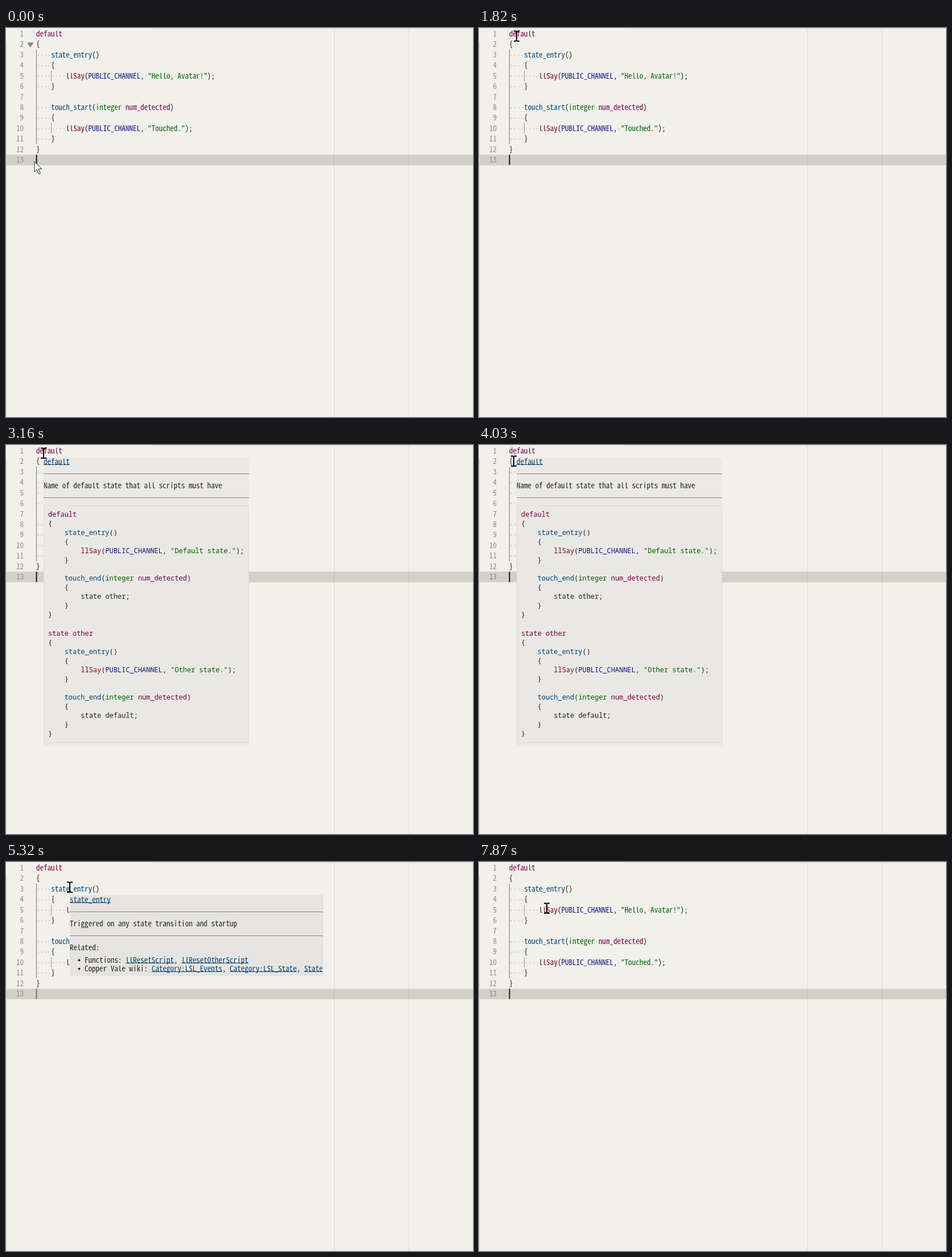
Animation of 820x683 px, one loop 8 s. Source, as an HTML page:

```html
<!DOCTYPE html>
<html lang="en">
<head>
<meta charset="utf-8">
<title>Script editor hover help</title>
<style>
  html, body { margin: 0; width: 100%; height: 100%; overflow: hidden; background: #f1f0eb; }
  svg { display: block; width: 100%; height: 100%; }
  text { white-space: pre; fill: #222; }
  .ui { font-family: "Noto Sans Mono CJK JP", "Noto Sans Mono CJK SC", "Noto Sans Mono", monospace; }
  .code { font-family: "Noto Sans Mono", "DejaVu Sans Mono", monospace; }
  text.keyword { fill: #780042; }
  text.event, text.link { fill: #004475; }
  text.type, text.string { fill: #006000; }
  text.call { fill: #80002c; }
  text.constant { fill: #14147f; }
  text.number { fill: #8d8b85; text-anchor: end; }
</style>
</head>
<body>
<svg id="stage" viewBox="0 0 820 683" xmlns="http://www.w3.org/2000/svg">
  <rect width="820" height="683" fill="#f1f0eb"/>
  <rect x="257" width="563" height="1" fill="#d6d5d0"/>
  <rect width="1" height="24" fill="#fafaf8"/>
  <rect y="24" width="1" height="659" fill="#d8d7d2"/>
  <rect x="1" y="222.5" width="819" height="18.5" fill="#d3d0c8"/>
  <path d="M576.5 1V683M707.5 1V683" stroke="#000" stroke-opacity=".085"/>
  <path d="M53.5 38V204" stroke="#77766f"/>
  <path d="M79.5 75V94M79.5 167V185.500" stroke="#96958f"/>
  <g id="editor"></g>
  <path id="fold" d="M37 25.500H48.500L42.750 34Z" fill="#858580"/>
  <rect id="caret" x="52.500" y="222.500" width="2.200" height="18" fill="#222"/>
  <g id="stateHelp">
    <rect x="66" y="22" width="361" height="507" fill="#eae9e5"/>
    <rect x="66.500" y="106.500" width="360" height="416" rx="2" fill="#e9e8e4" stroke="#dbdad6"/>
    <path d="M66 50.500H427M66 92.500H427" stroke="#85847f"/>
  </g>
  <g id="entryHelp">
    <rect x="112" y="58" width="445" height="142" fill="#e5e4e0"/>
    <path d="M112 87.500H557M112 129.500H557" stroke="#82817c"/>
    <circle cx="128.500" cy="172.500" r="2" fill="#222"/>
    <circle cx="128.500" cy="187.500" r="2" fill="#222"/>
  </g>
  <g id="pointer">
    <path id="arrow" d="M0 .5V18.500L4.200 14.700L7.500 22.500L10.300 21.300L7 13.500H12.700Z" fill="#fff" stroke="#222"/>
    <path id="beam" d="M-5 -8.500H-1.500L0 -7.500L1.500 -8.500H5M0 -8V8.500M-5 9H-1.500L0 8L1.500 9H5" fill="none" stroke="#000" stroke-width="2"/>
  </g>
</svg>
<script>
const $ = id => document.getElementById(id);
const LOOP = 8000;

// Pick the font size whose monospace advance equals the wanted cell width.
function makeFont(className, cell) {
  const probe = document.createElement('canvas').getContext('2d');
  const sample = document.createElement('span');
  sample.className = className;
  document.body.append(sample);
  probe.font = '100px ' + getComputedStyle(sample).fontFamily;
  sample.remove();
  return { className, cell, size: cell * 100 / probe.measureText('0').width };
}
const ui = makeFont('ui', 6.535);
const code = makeFont('code', 7.17);

function add(parent, tag, attributes, content = '') {
  const node = document.createElementNS('http://www.w3.org/2000/svg', tag);
  for (const [key, value] of Object.entries(attributes)) node.setAttribute(key, value);
  node.textContent = content;
  parent.append(node);
}

// y is the visual middle of the row.
function write(parent, font, x, y, content, kind = '') {
  add(parent, 'text', { x, y: y + 4.5, class: `${font.className} ${kind}`, 'font-size': font.size }, content);
  if (kind === 'link')
    add(parent, 'rect', { x, y: Math.round(y + 5), width: content.length * font.cell, height: 1, fill: '#004475' });
}

const TOKEN = /(?<string>"[^"]*")|(?<keyword>^default$|^state other$|num_detected)|(?<event>state_entry|touch_start|touch_end)|(?<type>integer)|(?<call>llSay)|(?<constant>PUBLIC_CHANNEL)|(?<plain>[^\s"]+?(?=PUBLIC|integer|"|\s|$))/g;

function writeCode(parent, font, x, y, pitch, source) {
  source.split('\n').forEach((line, row) => {
    for (const match of line.matchAll(TOKEN)) {
      const kind = Object.keys(match.groups).find(name => match.groups[name]);
      write(parent, font, x + match.index * font.cell, y + row * pitch, match[0], kind);
    }
  });
}

const script = `default
{
    state_entry()
    {
        llSay(PUBLIC_CHANNEL, "Hello, Avatar!");
    }

    touch_start(integer num_detected)
    {
        llSay(PUBLIC_CHANNEL, "Touched.");
    }
}
`;
const PITCH = 18.42;
writeCode($('editor'), ui, 53, 10.5, PITCH, script);
script.split('\n').forEach((line, row) => {
  const y = 10.5 + row * PITCH;
  write($('editor'), ui, 31, y, row + 1, 'number');
  for (const space of line.matchAll(/ /g))
    add($('editor'), 'circle', { cx: 53 + (space.index + .5) * ui.cell, cy: y + .5, r: 1.1, fill: '#c9c7c0' });
});

const block = (head, message, next) => `${head}
{
    state_entry()
    {
        llSay(PUBLIC_CHANNEL, "${message}");
    }

    touch_end(integer num_detected)
    {
        state ${next};
    }
}`;
const stateHelp = $('stateHelp');
write(stateHelp, ui, 66, 29, 'default', 'link');
write(stateHelp, ui, 66, 71, 'Name of default state that all scripts must have');
writeCode(stateHelp, code, 74, 121, 16.08,
  block('default', 'Default state.', 'other') + '\n\n' + block('state other', 'Other state.', 'default'));

const entryHelp = $('entryHelp');
function writeLinks(y, label, links) {
  let x = 138;
  const put = (content, kind) => {
    write(entryHelp, ui, x, y, content, kind);
    x += content.length * ui.cell;
  };
  put(label);
  links.forEach((link, i) => {
    if (i) put(', ');
    put(link, 'link');
  });
}
write(entryHelp, ui, 112, 66, 'state_entry', 'link');
write(entryHelp, ui, 112, 108, 'Triggered on any state transition and startup');
write(entryHelp, ui, 112, 150, 'Related:');
writeLinks(172, 'Functions: ', ['llResetScript', 'llResetOtherScript']);
writeLinks(187, 'Copper Vale wiki: ', ['Category:LSL_Events', 'Category:LSL_State', 'State']);

// [time, x, y]
const path = [
  [0, 50, 234], [500, 50, 234], [620, 60, 150], [720, 67, 90], [820, 70, 61], [1080, 70, 61],
  [1110, 71, 59], [1300, 71, 45], [1500, 69, 28], [1820, 66, 14], [3920, 66, 14],
  [4030, 61, 28], [4160, 55, 40], [4320, 62, 50], [4520, 90, 53], [4730, 109, 47], [4860, 112, 44],
  [6640, 112, 44], [6660, 111, 45], [6800, 110, 47], [6860, 98, 62], [7030, 97, 81],
  [7160, 97, 81], [7600, 111, 84], [7870, 119, 81], [LOOP, 119, 81]
];

const ramp = (t, from, to) => Math.min(1, Math.max(0, (t - from) / (to - from)));
const ease = k => k * k * (3 - 2 * k);

function pointAt(t) {
  const i = path.findIndex(key => key[0] > t);
  const a = path[i - 1], b = path[i];
  const k = ramp(t, a[0], b[0]);
  return [a[1] + (b[1] - a[1]) * k, a[2] + (b[2] - a[2]) * k];
}

function showHelp(node, t, start, end, from) {
  const shown = t >= start && t < end;
  node.style.opacity = shown ? from + (1 - from) * ramp(t, start, start + 70) : 0;
}

function render(t) {
  const isArrow = t < 600;
  $('pointer').setAttribute('transform', `translate(${pointAt(t)})`);
  $('arrow').style.display = isArrow ? '' : 'none';
  $('beam').style.display = isArrow ? 'none' : '';
  $('fold').style.opacity = 1 - ramp(t, 560, 820);

  const blink = t % 1020;
  $('caret').style.opacity = 1 - ease(ramp(blink, 80, 360)) + ease(ramp(blink, 500, 780));

  showHelp(stateHelp, t, 2200, 4200, .9);
  showHelp(entryHelp, t, 5250, 6950, .4);
}

const begin = performance.now();
function tick() {
  render((performance.now() - begin) % LOOP);
  requestAnimationFrame(tick);
}
tick();
</script>
</body>
</html>
```
